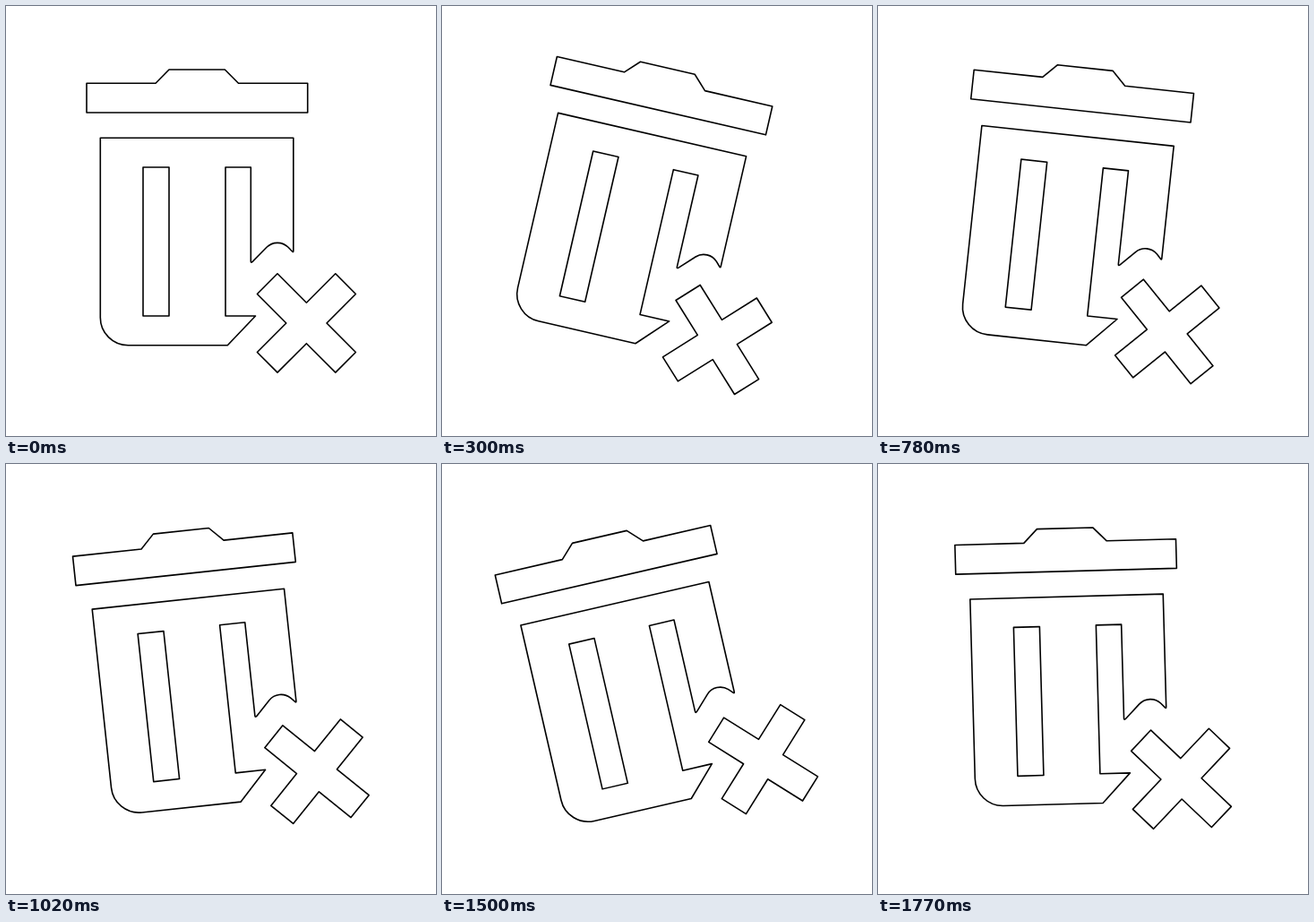
Write an HTML page that moves like this. It is 480 by 480 pixels and loops after 1800 ms.

```html
<!DOCTYPE html>
<html lang="en">
<head>
<meta charset="utf-8">
<title>Swinging bin</title>
<style>
  html, body { margin: 0; height: 100%; overflow: hidden; background: #fff; }
  svg { display: block; width: 100%; height: 100%; }
</style>
</head>
<body>
<svg viewBox="0 0 480 480">
  <g id="bin" fill="#fff" stroke="#000" stroke-width="1.6" stroke-linejoin="round">
    <!-- lid -->
    <path d="M90 86.3H167L182 71H244.3L259.5 86.3H336.7V119H90Z"/>
    <!-- body with torn corner -->
    <path d="M105.3 147.3H320.8V273.5Q320.8 275.5 319.3 273.8L315 269.3A17 17 0 0 0 291 269.3L275.2 285.4Q273.3 287 273.3 285V180H245V346H278.5L247.3 378.7H136.3A31 31 0 0 1 105.3 347.7Z"/>
    <!-- slot -->
    <path d="M153 180H182V346H153Z"/>
    <!-- cross -->
    <path d="M303 298.8L335.4 331.2L367.8 298.8L390.4 321.5L358 354L390.4 386.5L367.8 409.1L335.4 376.7L303 409.1L280.4 386.5L312.8 354L280.4 321.5Z"/>
  </g>
</svg>
<script>
  const LOOP = 1800, STEP = 30, SWING = 15;
  const bin = document.getElementById('bin');

  function draw() {
    // The swing advances in fixed steps; the small offset absorbs timer rounding.
    const t = Math.floor((performance.now() + 1) / STEP) * STEP % LOOP;
    const angle = SWING * Math.sin(2 * Math.PI * t / LOOP);
    bin.setAttribute('transform', `rotate(${angle} 240 240)`);
    requestAnimationFrame(draw);
  }
  draw();
</script>
</body>
</html>
```
